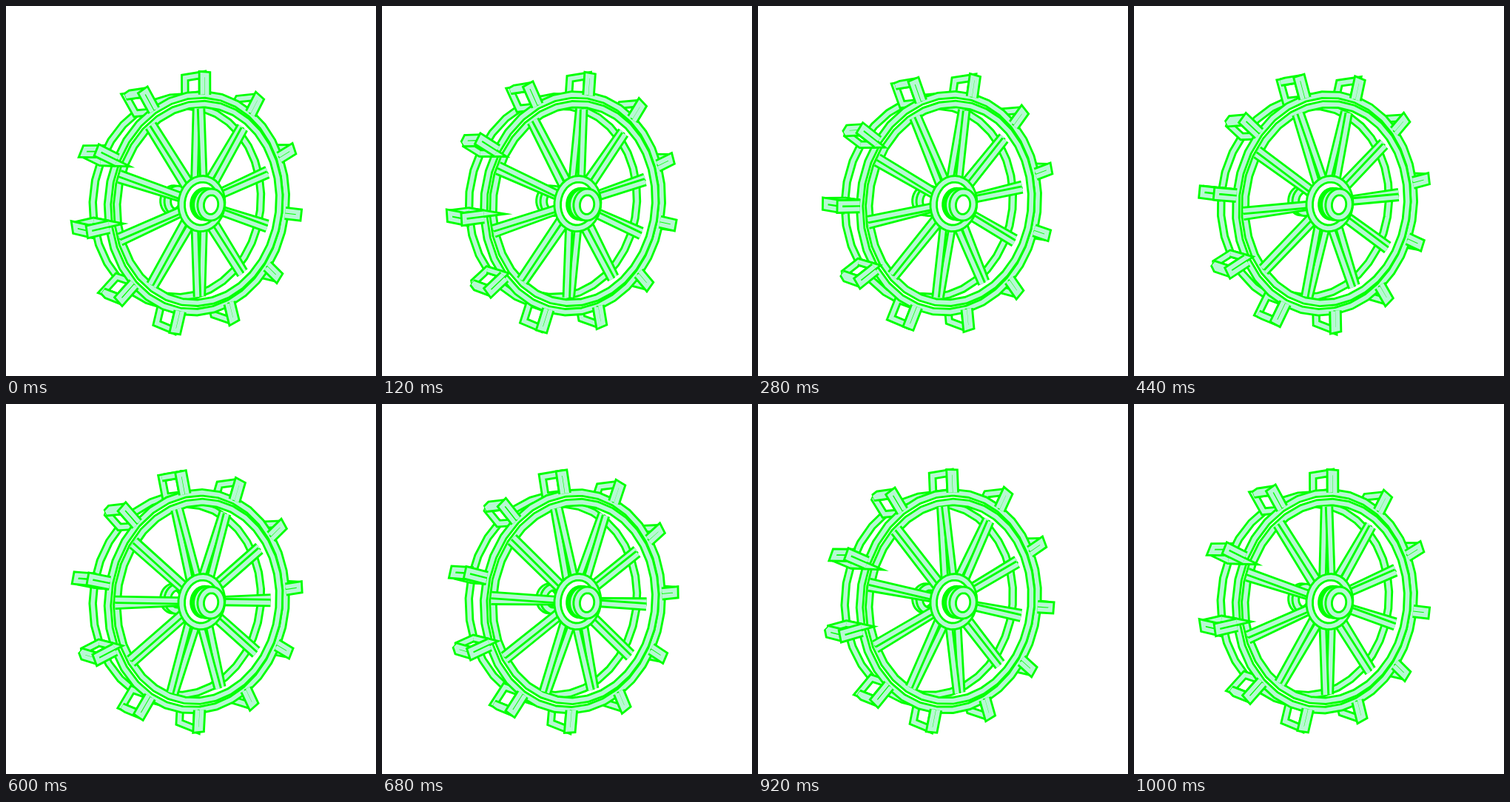
These frames come from a looping animation (500x500 px, 1.04 s). An HTML page with a canvas:

```html
<!DOCTYPE html>
<html lang="en">
<head>
<meta charset="utf-8">
<title>Turning paddle wheel</title>
<style>
  html, body { margin: 0; width: 100%; height: 100%; overflow: hidden; background: #fff; }
  canvas { display: block; width: 500px; height: 500px; }
</style>
</head>
<body>
<canvas id="stage" width="500" height="500"></canvas>
<script>
const ctx = document.getElementById('stage').getContext('2d');
const TAU = Math.PI * 2, RAD = Math.PI / 180;
const LIME = '#00ff00', MINT = '#b8f8d4';
const FOCUS = 894, YAW_COS = 0.827, YAW_SIN = 0.562, TILT = 0.06;
const CENTER_X = 19, CENTER_Y = 17.6;
const PADDLES = 11, SPOKES = 10, POSES = 13, POSE_MS = 80;
const RIM = 146.5, RIM_IN = 134, TIP = 172.5, REAR = -42, HALF = 3.7;

// Wheel coordinates (radius, angle, depth along the axle, sideways offset) to the screen.
function point(r, a, depth, side = 0) {
  const u = r * Math.cos(a) - side * Math.sin(a);
  const v = r * Math.sin(a) + side * Math.cos(a);
  const toward = depth * YAW_COS - u * YAW_SIN;
  const x = CENTER_X + depth * YAW_SIN + u * YAW_COS;
  const y = CENTER_Y - v + toward * TILT;
  const k = FOCUS / (FOCUS - toward - v * TILT);
  return [250 + k * x, 250 + k * y];
}

function trace(pts, closed) {
  ctx.beginPath();
  pts.forEach(p => ctx.lineTo(p[0], p[1]));
  if (closed) ctx.closePath();
}

function fillWhite(pts) {
  trace(pts, true);
  ctx.fillStyle = '#fff';
  ctx.fill();
}

// A mint band with lime borders.
function band(pts, closed, miter = 1.8) {
  trace(pts, closed);
  ctx.miterLimit = miter;
  for (const [color, width] of [[LIME, 11.4], [MINT, 5.7]]) {
    ctx.strokeStyle = color;
    ctx.lineWidth = width;
    ctx.stroke();
  }
}

function circle(r, depth, turn = 0, n = 33) {
  return Array.from({ length: n }, (_, i) => point(r, turn + i * TAU / n, depth));
}

function area(pts) {
  return pts.reduce((sum, p, i) => {
    const q = pts[(i + 1) % pts.length];
    return sum + p[0] * q[1] - q[0] * p[1];
  }, 0);
}

function paddleBody(a, near) {
  for (const s of [1, -1]) {
    const q = s * HALF;
    const face = [point(RIM, a, REAR, q), point(RIM, a, 0, q), point(TIP, a, 0, q), point(TIP, a, REAR, q)];
    if (area(face) * s >= 0) continue;
    fillWhite(face);
    band(face, true);
    if (near) band(face.slice(0, 3), false, 7);
  }
  const cap = [point(TIP, a, REAR, -HALF), point(TIP, a, 0, -HALF), point(TIP, a, 0, HALF), point(TIP, a, REAR, HALF)];
  if (area(cap) > 0) band(cap, true);
}

function paddleEnd(a) {
  band([point(RIM, a, 0, HALF), point(TIP, a, 0, HALF), point(TIP, a, 0, -HALF), point(RIM, a, 0, -HALF)], false);
}

function spoke(a) {
  for (const s of [1, -1]) {
    band([point(30, a, -14 - s * 9 * Math.sin(a), s * 1.2), point(129, a, -14, s * HALF)], false);
  }
}

function hub() {
  const ring = circle(33.5, -7);
  fillWhite(ring);
  band(ring, true);
  for (const depth of [-2, 1, 5]) band(circle(17, depth), true);
  const disc = circle(17, 14);
  fillWhite(disc);
  band(disc, true);
}

function draw(pose) {
  const turn = 90.3 * RAD - pose * TAU / PADDLES / POSES;
  const spread = n => Array.from({ length: n }, (_, i) => turn + i * TAU / n);
  const paddles = spread(PADDLES);
  const isNear = a => Math.cos(a) < -0.8;
  const front = circle(RIM, 0, turn), frontIn = circle(RIM_IN, 0, turn);

  ctx.fillStyle = '#fff';
  ctx.fillRect(0, 0, 500, 500);

  band(circle(RIM, REAR, turn), true);
  paddles.filter(a => !isNear(a)).forEach(a => paddleBody(a, false));
  fillWhite(front);

  ctx.save();
  trace(frontIn, true);
  ctx.clip();
  band(circle(RIM_IN, REAR, turn), true);
  band(circle(17, -79), true);
  band(circle(17, -68), true);
  ctx.restore();

  band(front, true);
  band(frontIn, true);
  spread(SPOKES).forEach(spoke);
  hub();

  for (const a of paddles) {
    if (isNear(a)) paddleBody(a, true);
    paddleEnd(a);
  }
}

// Each pose is held; the first one straddles the loop point.
const start = performance.now();
let shown = -1;
function tick() {
  const t = performance.now() - start;
  const pose = Math.floor((t + POSE_MS / 2) / POSE_MS) % POSES;
  if (pose !== shown) draw(shown = pose);
  requestAnimationFrame(tick);
}
tick();
</script>
</body>
</html>
```
